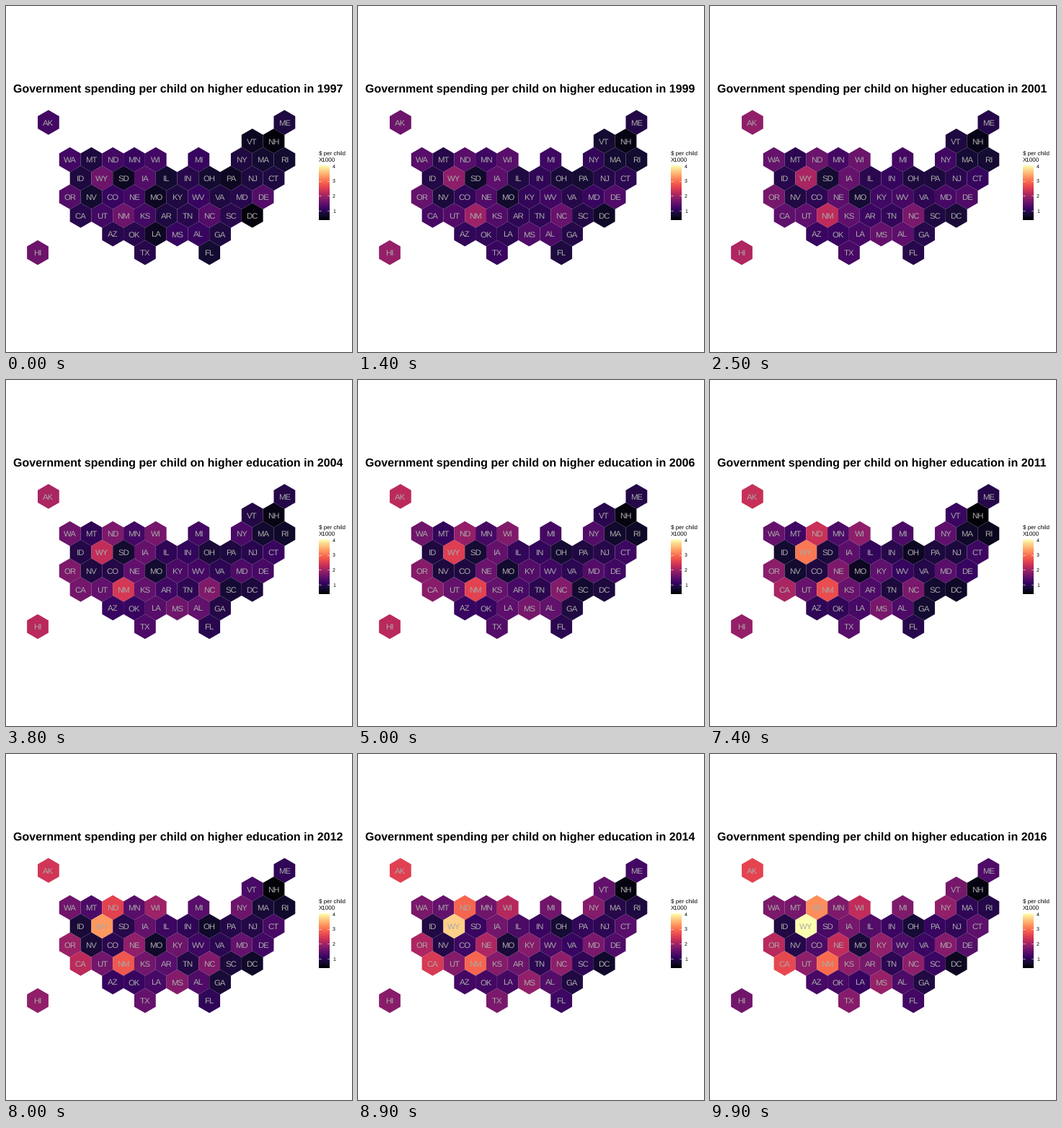
A matplotlib script for the animation above (10 s loop, 480x480 px).

```python
import matplotlib.pyplot as plt
import numpy as np
from matplotlib.animation import FuncAnimation
from matplotlib.collections import PolyCollection
from matplotlib.colors import LinearSegmentedColormap

SIZE, DPI = 480, 80
FRAMES = 100
FIRST, LAST = 1997, 2016
X0, Y0 = 58.9, 161.5       # centre of the top-left tile
STEP, RADIUS = 29.77, 17.2
LOW, HIGH = 0.37, 4.06     # range of the colour scale

# Tile rows from top to bottom: runs of neighbours with their first column
ROWS = [
    {0: "AK", 11: "ME"},
    {9.5: "VT NH"},
    {1: "WA MT ND MN WI", 7: "MI", 9: "NY MA RI"},
    {1.5: "ID WY SD IA IL IN OH PA NJ CT"},
    {1: "OR NV CO NE MO KY WV VA MD DE"},
    {1.5: "CA UT NM KS AR TN NC SC DC"},
    {3: "AZ OK LA MS AL GA"},
    {-0.5: "HI", 4.5: "TX", 7.5: "FL"},
]

# Spending in percent of the scale: level in the first year, rise until the
# last one, and how far the years between bulge above or below that line
START = {
    2: "NH DC",
    7: "VT SD PA MO LA",
    10: "MA RI IL OH NV FL",
    13: "ME MT ID NJ CT KY VA NY GA AR",
    16: "IN MD CA TN SC AZ OK TX",
    20: "MN MI CO WV AL MS",
    23: "WA ND WI NE UT KS AK",
    27: "OR IA DE NC",
    33: "WY HI NM",
}
RISE = {
    1: "NH OH ID TN GA DE HI",
    5: "DC MO NV NJ IN SC CO WV AL RI",
    8: "MA VA AZ OK IA",
    13: "LA FL ME WA NC PA",
    17: "SD IL CT MN MI UT KS",
    22: "MT TX OR MS AR MD",
    28: "VT KY NY NE WI",
    37: "AK NM",
    45: "CA",
    54: "ND",
    67: "WY",
}
BULGE = {
    16: "HI LA",
    8: "AK NM AL DC",
    4: "WA NC MS",
    -5: "RI DE NE VT SD MT MI MN MA ME",
    -9: "CO SC ND WY",
}
# Ups and downs shared by all states
CYCLE_AT = [0, 0.25, 0.5, 0.6, 0.75, 0.9, 1]
CYCLE = [0, 2.5, 0, 0, -4, 0, 0]

cmap = LinearSegmentedColormap.from_list("spending", [
    "#000003", "#140b32", "#370560", "#5f106c", "#8e1e6a", "#bd2a5c",
    "#e5434f", "#f96a4f", "#fe9a60", "#fecc86", "#fcfeb0"])

plt.rcParams["font.family"] = "Liberation Sans"
plt.rcParams["text.hinting"] = "none"

tiles = [(name, X0 + STEP * (col + i), Y0 + 1.5 * RADIUS * r)
         for r, runs in enumerate(ROWS)
         for col, names in runs.items()
         for i, name in enumerate(names.split())]


def per_tile(groups):
    value = {n: v for v, names in groups.items() for n in names.split()}
    return np.array([value.get(name, 0) for name, _, _ in tiles])


start, rise, bulge = map(per_tile, (START, RISE, BULGE))


def levels(s):
    """Scale position of every tile at time s in 0..1."""
    value = (start + rise * s + bulge * np.sin(np.pi * s)
             + np.interp(s, CYCLE_AT, CYCLE))
    return np.clip(value / 100, 0.01, 1)


fig = plt.figure(figsize=(SIZE / DPI, SIZE / DPI), dpi=DPI, facecolor="white")
ax = fig.add_axes([0, 0, 1, 1])
ax.axis("off")


def label(x, y, s, px, **kw):
    return ax.text(x, y, s, fontsize=px * 72 / DPI, va="baseline", **kw)


def hexagon(x, y):
    a = np.radians(np.arange(30, 390, 60))
    return np.column_stack([x + RADIUS * np.cos(a), y + RADIUS * np.sin(a)])


cells = PolyCollection([hexagon(x, y) for _, x, y in tiles], linewidths=0)
ax.add_collection(cells)
for name, x, y in tiles:
    label(x, y + 4.2, name, 11.4, color="#a9a9a9", ha="center")

title = label(10.5, 120, "", 16, weight="bold")

# Legend
left, right, top, bottom = 434, 449, 221, 297
label(left, 207.8, "$ per child", 8)
label(left, 216.2, "X1000", 8)
ax.imshow(np.linspace(1, 0, 256)[:, None], cmap=cmap, aspect="auto",
          extent=(left, right, bottom, top), interpolation="bilinear")
for v in (1, 2, 3, 4):
    y = bottom - (v - LOW) / (HIGH - LOW) * (bottom - top)
    for x in (left, right - 3):
        ax.plot([x, x + 3], [y, y], color="white", lw=0.5)
    label(453, y + 2.5, str(v), 7)

ax.set_xlim(0, SIZE)
ax.set_ylim(SIZE, 0)


def update(i):
    cells.set_facecolor(cmap(levels(i / (FRAMES - 1))))
    year = FIRST + i * (LAST - FIRST) // (FRAMES - 1)
    title.set_text(
        f"Government spending per child on higher education in {year}")
    return cells, title


anim = FuncAnimation(fig, update, frames=FRAMES, interval=100,
                     repeat=True, repeat_delay=0)
plt.show()
```
